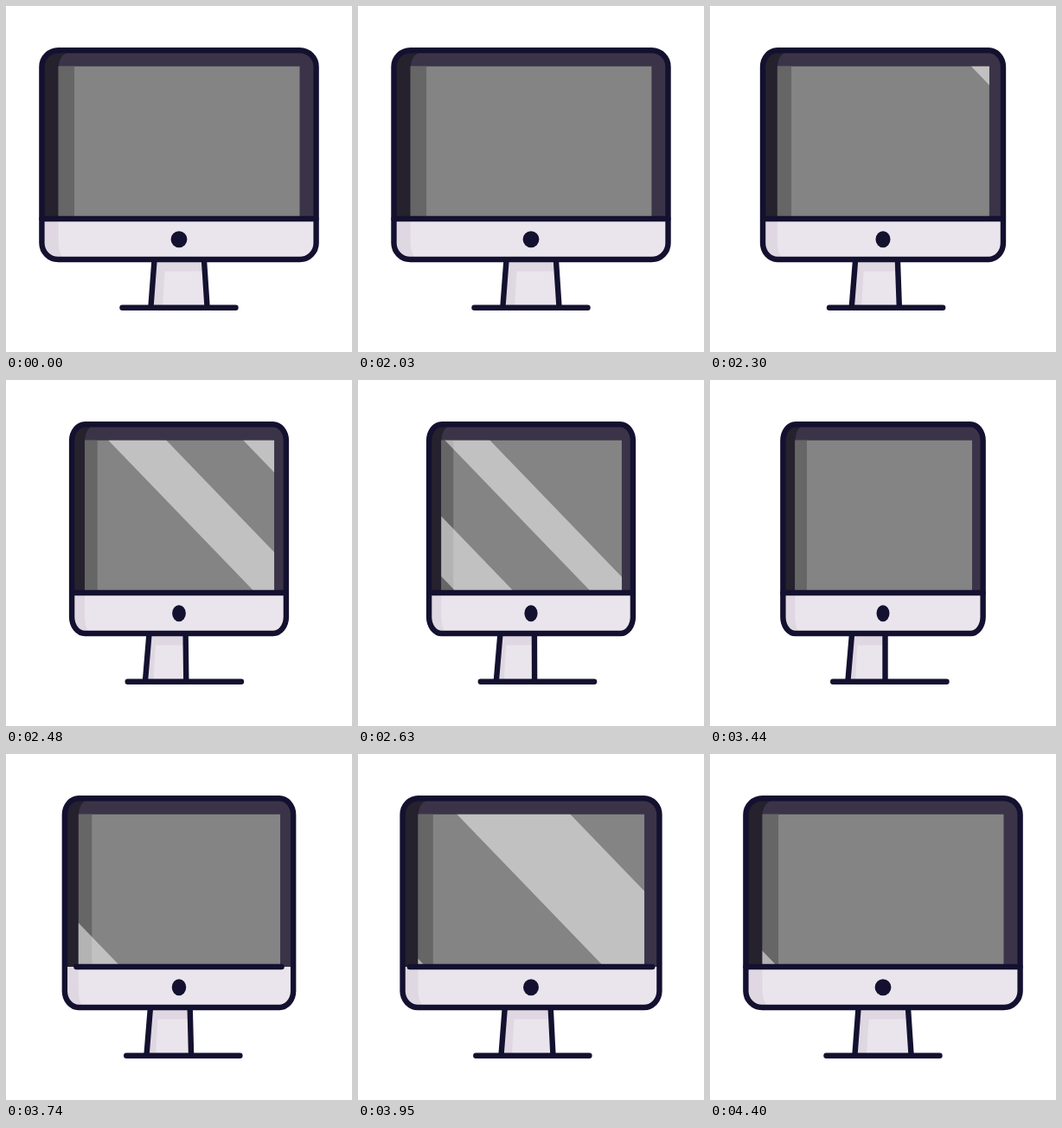
An HTML page with a canvas for the animation above (4.43 s loop, 400 px wide and 400 px high).

```html
<!DOCTYPE html>
<html>
<head>
<meta charset="utf-8">
<style>
  html, body { margin: 0; width: 100%; height: 100%; overflow: hidden; background: #fff; }
  canvas { display: block; width: 400px; height: 400px; }
</style>
</head>
<body>
<canvas id="stage" width="400" height="400"></canvas>
<script>
const ctx = document.getElementById('stage').getContext('2d');
const LOOP = 4430, REST = 2030, STEP = 30;
const INK = '#13112f', BEZEL = '#3b3448', BEZEL_DARK = '#25212d';
const CASE = '#eae5ec', CASE_SHADE = '#dfd7e1';
const SCREEN = '#848484', SCREEN_SHADE = '#666666';
const TOP = 69.5, CHIN = 246, SLOPE = 0.965;

// Symmetric ease, cubic-bezier(1/3, 0, 1/3, 1).
function ease(time, start, duration) {
  const x = Math.min(1, Math.max(0, (time - start) / duration));
  let lo = 0, hi = 1;
  for (let i = 0; i < 24; i++) {
    const s = (lo + hi) / 2;
    if (s * (1 - s) + s * s * s < x) lo = s; else hi = s;
  }
  return lo * lo * (3 - 2 * lo);
}

const mix = (a, b, k) => a + (b - a) * k;

function rect(x0, y0, x1, y1, color) {
  ctx.fillStyle = color;
  ctx.fillRect(x0, y0, x1 - x0, y1 - y0);
}

function polygon(points, color) {
  ctx.fillStyle = color;
  ctx.beginPath();
  points.forEach(([x, y]) => ctx.lineTo(x, y));
  ctx.closePath();
  ctx.fill();
}

function line(x0, y0, x1, y1) {
  ctx.beginPath();
  ctx.moveTo(x0, y0);
  ctx.lineTo(x1, y1);
  ctx.stroke();
}

function glare(left, width) {
  const shift = (CHIN - TOP) * SLOPE;
  polygon([[left, TOP], [left + width, TOP], [left + width + shift, CHIN], [left + shift, CHIN]],
    'rgba(255,255,255,.5)');
}

function drawStand(m) {
  const topL = m(171.5, 164), topR = m(229, 202.5);
  const botL = m(167.5, 159.5), botR = m(232.5, 202.5);
  polygon([[topL, 293], [topR, 293], [botR, 348], [botL, 348]], CASE_SHADE);
  polygon([[m(183.5, 170.5), 306.5], [topR, 306.5], [botR, 348], [m(181, 168), 348]], CASE);
  line(topL, 294, botL, 347);
  line(topR, 294, botR, 347);
  line(m(134.5, 142.2), 348.7, m(265.5, 273.5), 348.7);
}

function drawMonitor(m, lineHalf, time) {
  const left = m(41.4, 84.4), right = 400 - left;
  const screenL = m(60.5, 98.3), screenR = m(339.7, 303);
  const radius = { x: m(19, 14.5), y: 19 };
  const shell = new Path2D();
  shell.roundRect(left, 51.2, right - left, 241.8, radius);

  ctx.save();
  ctx.clip(shell);
  rect(left, 48, right, CHIN, BEZEL);
  ctx.fillStyle = BEZEL_DARK;
  ctx.beginPath();
  ctx.moveTo(left, 48);
  ctx.lineTo(screenL + m(13, 9), 53);
  ctx.quadraticCurveTo(screenL, 56, screenL, 74);
  ctx.lineTo(screenL, CHIN);
  ctx.lineTo(left, CHIN);
  ctx.fill();

  rect(left, CHIN, right, 296, CASE);
  ctx.fillStyle = CASE_SHADE;
  ctx.beginPath();
  ctx.moveTo(left, CHIN);
  ctx.lineTo(screenL, CHIN);
  ctx.lineTo(screenL, 272);
  ctx.quadraticCurveTo(screenL, 286, screenL + m(7, 5), 293);
  ctx.lineTo(left, 296);
  ctx.fill();

  ctx.beginPath();
  ctx.rect(screenL, TOP, screenR - screenL, CHIN - TOP);
  ctx.clip();
  rect(screenL, TOP, screenR, CHIN, SCREEN);
  rect(screenL, TOP, m(79, 112), CHIN, SCREEN_SHADE);
  const sweep = mix(350, -300, ease(time, 2141, 1107));
  glare(sweep, 67);
  glare(sweep + 156, 52);
  glare(mix(-240, 345, ease(time, 3588, 840)), 131);
  ctx.restore();

  ctx.stroke(shell);
  line(200 - lineHalf, CHIN, 200 + lineHalf, CHIN);
  ctx.fillStyle = INK;
  ctx.beginPath();
  ctx.ellipse(200, 269.8, m(9.4, 7.5), 9.5, 0, 0, Math.PI * 2);
  ctx.fill();
}

function draw(now) {
  const raw = now % LOOP;
  const time = raw < REST ? 0 : REST + Math.floor((raw - REST) / STEP) * STEP;
  const turnIn = ease(time, 2010, 820);
  const turn = turnIn - ease(time, 3430, 970);
  const lineTurn = turnIn - ease(time, 3631, 770);
  const m = (wide, narrow) => mix(wide, narrow, turn);

  rect(0, 0, 400, 400, '#fff');
  ctx.strokeStyle = INK;
  ctx.lineWidth = 6.4;
  ctx.lineCap = 'round';
  drawStand(m);
  drawMonitor(m, mix(158.5, 115.5, lineTurn), time);
}

const origin = performance.now();
function tick() {
  draw(performance.now() - origin);
  requestAnimationFrame(tick);
}
tick();
</script>
</body>
</html>
```
